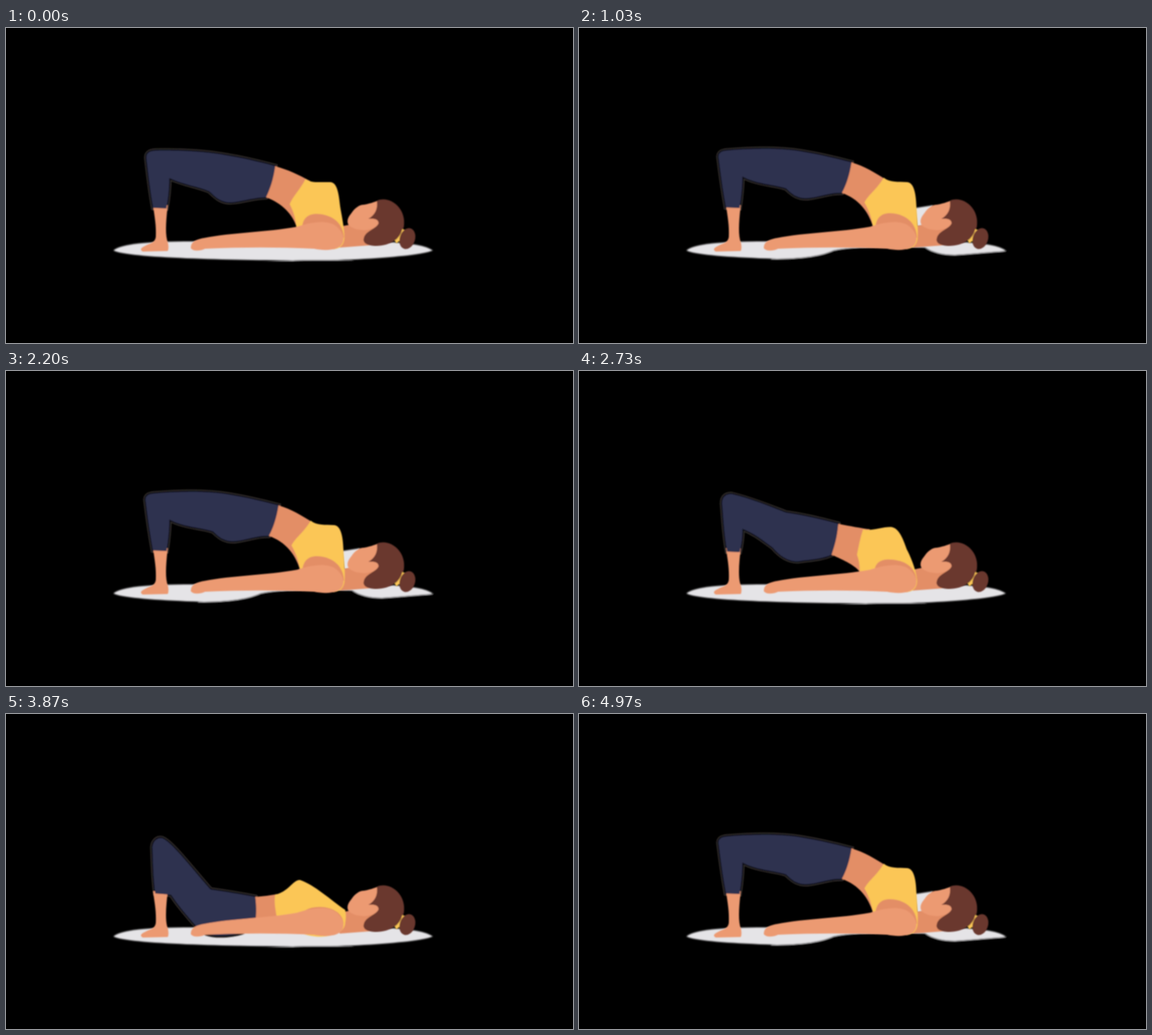
An HTML page that plays this animation: 1003 px wide and 558 px high, repeating every 5000 ms.

```html
<!DOCTYPE html>
<html lang="en">
<head>
<meta charset="utf-8">
<title>Bridge exercise</title>
<style>
  html, body { margin: 0; width: 100%; height: 100%; overflow: hidden; background: #000; }
  svg { display: block; width: 100%; height: 100%; }
  .skin { fill: #ec9a72; }
  .shade { fill: #e38e66; }
  .cloth { fill: #fbc656; }
  .hair { fill: #6a392f; }
  .mat { fill: #e5e4e7; }
</style>
</head>
<body>
<svg viewBox="0 0 1003 558">
  <defs>
    <filter id="soft"><feGaussianBlur stdDeviation="0.8"/></filter>
    <filter id="softer"><feGaussianBlur stdDeviation="1.6"/></filter>
  </defs>
  <g filter="url(#softer)">
    <path class="mat" d="M190 394C205 382 250 378 330 378L650 378C720 380 743 386 755 394C735 403 640 412 520 412C400 411 215 408 190 394Z"/>
    <path id="bite" d="M340 409C400 409 430 403 450 394C480 386 570 386 612 388C625 398 645 402 665 402C700 400 735 396 760 395L760 420L340 420Z"/>
    <ellipse id="notch" cx="433" cy="411" rx="22" ry="9"/>
    <path id="gap" class="mat" d="M594 319L626 314L620 352L598 352Z"/>
  </g>
  <g filter="url(#soft)">
    <path id="pantsRim" fill="none" stroke="#383330" stroke-width="8"/>
    <path id="pantsGap" fill="none" stroke="#101015" stroke-width="5"/>
    <path class="skin" d="M260 314L286 314C284 335 281 360 285 376C288 384 288 392 286 395L242 396C236 393 239 389 246 386C255 381 264 380 265 370C266 350 263 335 260 314Z"/>
    <path id="waist" class="shade"/>
    <path id="pants" fill="#2f324f"/>
    <path class="shade" d="M592 352C610 346 630 350 662 346L656 384L590 389Z"/>
    <path class="skin" d="M606 349C602 342 605 335 611 328C617 319 625 313 633 313C641 312 652 308 658 306L680 330L664 354C652 352 645 357 636 358C625 358 613 356 606 349Z"/>
    <path class="hair" d="M656 306C678 296 708 318 704 350C701 372 680 386 655 386C640 386 630 381 633 372C636 359 655 356 659 346C659 339 652 337 641 338C653 331 658 320 656 306Z"/>
    <path d="M689 379Q700 372 704 357" fill="none" stroke="#fbc656" stroke-width="6"/>
    <ellipse class="hair" cx="710" cy="373" rx="13.5" ry="19" transform="rotate(18 710 373)"/>
    <path id="shirt" class="cloth"/>
    <path id="armpit" class="shade"/>
    <path class="skin" d="M327 390C327 380 333 375 350 372C400 362 460 362 515 352C540 344 568 339 584 351C602 366 600 384 585 390C575 394 560 394 545 391C480 388 420 388 352 391C342 396 330 395 327 390Z"/>
  </g>
</svg>
<script>
const LOOP = 5000;
const MIDDLE = 0.41; // share of the way down at the middle pose

// Each part: raised, middle and lowered pose with the same path structure.
const poses = {
  pants: [
    "M260 318C254 285 250 255 247 230C246 222 250 218 262 217C320 212 365 214 395 219C425 224 455 231 482 238C479 260 472 280 465 292C445 291 430 298 408 301C385 304 375 292 366 284C345 277 315 277 289 263C289 285 286 305 284 319Z",
    "M262 320C256 285 255 255 253 235C253 224 258 218 270 218C305 226 340 240 366 250C395 254 430 262 459 270C457 295 452 310 447 325C430 332 412 333 390 336C370 338 355 326 343 312C325 299 310 287 289 279C289 295 288 305 284 321Z",
    "M264 318C260 285 260 260 259 236C260 224 268 219 275 220C290 222 330 275 362 311C390 315 415 319 441 324C443 340 443 350 442 361C435 385 415 390 390 392C360 394 345 388 334 373C320 357 305 340 292 320C291 320 291 320 290 320Z"
  ],
  waist: [
    "M482 238C505 245 522 255 545 270L520 352C512 325 495 303 465 292Z",
    "M459 270C480 274 500 278 515 280L497 356C490 345 470 335 447 325Z",
    "M441 324C455 323 468 321 480 319L480 362C465 365 450 365 442 361Z"
  ],
  shirt: [
    "M539 265C528 285 512 295 505 309C514 325 518 338 520 352C540 390 560 393 575 392C590 392 598 385 599 372C600 355 598 335 597 318C596 290 592 274 580 273C565 272 550 274 539 265Z",
    "M503 280C498 295 495 310 492 325C496 335 497 345 497 356C520 385 560 393 575 392C590 392 599 385 598 370C596 350 585 325 580 316C570 285 562 277 552 276C535 276 515 284 503 280Z",
    "M476 320C474 335 477 348 479 360C481 362 485 365 490 368C520 397 560 397 575 392C590 390 600 380 600 370C602 360 601 352 600 347C575 330 545 302 520 294C508 293 500 315 476 320Z"
  ],
  armpit: [
    "M524 354C526 328 545 325 565 330C585 336 597 350 598 372Z",
    "M523 354C524 333 545 331 565 336C585 340 597 355 597 372Z",
    "M523 354C530 344 545 341 560 342C580 343 597 355 597 372Z"
  ]
};

const el = id => document.getElementById(id);
const ramp = (t, from, to) => Math.min(1, Math.max(0, (t - from) / (to - from)));
const ease = u => (1 - Math.cos(Math.PI * u)) / 2;
const glide = (t, from, to) => ease(ramp(t, from, to));

const parts = Object.entries(poses).map(([id, paths]) => ({
  id,
  template: paths[0],
  values: paths.map(path => path.match(/\d+/g).map(Number))
}));

// Quadratic blend passing through all three poses.
function blend(part, p) {
  const a = (p - MIDDLE) * (p - 1) / MIDDLE;
  const b = p * (p - 1) / (MIDDLE * (MIDDLE - 1));
  const c = p * (p - MIDDLE) / (1 - MIDDLE);
  const [high, mid, low] = part.values;
  let i = 0;
  return part.template.replace(/\d+/g, () => {
    const value = a * high[i] + b * mid[i] + c * low[i];
    i++;
    return value.toFixed(2);
  });
}

function loweredAmount(t) {
  if (t < 1000) return 0.09 * (1 - glide(t, 0, 140));
  return glide(t, 2270, 3300) - glide(t, 4350, 4940);
}

function draw(t) {
  const lowered = loweredAmount(t);
  for (const part of parts) el(part.id).setAttribute("d", blend(part, lowered));
  const pantsPath = el("pants").getAttribute("d");
  el("pantsRim").setAttribute("d", pantsPath);
  el("pantsGap").setAttribute("d", pantsPath);

  const worn = glide(t, 0, 350) - glide(t, 2250, 2600) + glide(t, 4700, 4950);
  el("bite").setAttribute("transform", `translate(0 ${24 * (1 - worn)})`);
  el("notch").setAttribute("opacity", glide(t, 3200, 3400) - glide(t, 3500, 3750));
  el("gap").setAttribute("opacity", 1 - ramp(lowered, 0.01, 0.08));
}

function tick(now) {
  draw(now % LOOP);
  requestAnimationFrame(tick);
}
draw(0);
requestAnimationFrame(tick);
</script>
</body>
</html>
```
